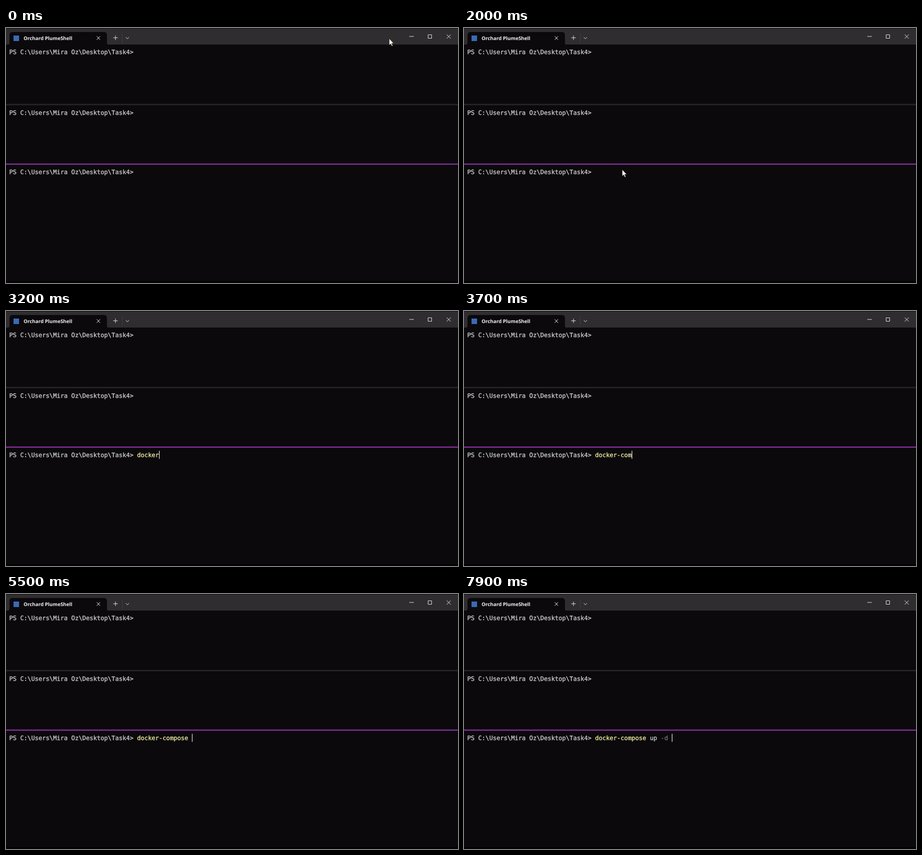
An HTML page with a canvas that plays this animation: 900x508 px, repeating every 8000 ms.

```html
<!DOCTYPE html>
<html lang="en">
<head>
<meta charset="utf-8">
<title>Terminal</title>
<style>
  html, body { margin: 0; width: 100%; height: 100%; overflow: hidden; background: #0b090c; }
  canvas { display: block; }
</style>
</head>
<body>
<canvas id="stage" width="900" height="508"></canvas>
<script>
const ctx = document.getElementById('stage').getContext('2d');
const LOOP = 8000, TICK = 100, BLINK = 530;
const LEFT = 6.5, CELL = 7.27;
const PROMPT = 'PS C:\\Users\\Mira Oz\\Desktop\\Task4>';
const COLORS = { back: '#0b090c', bar: '#2f2d30', text: '#cccacc', command: '#eeeaa2', option: '#767376' };

// One character per tick: "." is a pause, "<" a backspace.
const TYPING_START = 2400;
const TYPING = 'd.oc.ke.r.-compo...use..<<<se.. ...u.p... .........-.d. ';

const POINTER_HOME = { x: 763, y: 21 };
const POINTER_MOVES = [
  { from: 200, to: 500, x: 793, y: 77 },
  { from: 800, to: 1200, x: 201, y: 344 },
  { from: 1300, to: 1400, x: 166, y: 358 },
  { from: 1400, to: 1500, x: 315, y: 282 }
];
const ARROW = new Path2D('M0 0V13.2L3 10.4L5.2 15.2L7.2 14.3L5 9.7H9Z');

function rect(x, y, w, h, color) {
  ctx.fillStyle = color;
  ctx.fillRect(x, y, w, h);
}

function stroke(path, color = '#e4e2e4') {
  ctx.strokeStyle = color;
  ctx.lineWidth = 1;
  ctx.stroke(new Path2D(path));
}

// A hairline outline gives the terminal face its semi-bold weight.
function write(text, column, baseline, color) {
  const x = LEFT + column * CELL;
  ctx.font = '12.08px "DejaVu Sans Mono", monospace';
  ctx.fillStyle = ctx.strokeStyle = color;
  ctx.lineWidth = 0.35;
  ctx.fillText(text, x, baseline);
  ctx.strokeText(text, x, baseline);
}

function drawTitleBar() {
  rect(0, 0, 900, 33, COLORS.bar);
  rect(0, 0, 900, 1, '#0d0b0e');
  ctx.fillStyle = COLORS.back;
  ctx.fill(new Path2D('M4 33Q7 33 7 30V14Q7 8 13 8H195Q201 8 201 14V30Q201 33 204 33Z'));
  rect(15, 15, 11, 11, '#3b69b5');

  ctx.font = '700 9.8px "Open Sans", sans-serif';
  ctx.fillStyle = '#f4f2f4';
  ctx.fillText('Orchard PlumeShell', 35, 24);

  stroke('M180.5 16.5l7 7m0 -7l-7 7');
  stroke('M213.5 19.5h9m-4.5 -4.5v9');
  stroke('M231.5 11v18', '#403e41');
  stroke('M238.5 18.5l3.2 3l3.2 -3');
  stroke('M803 16.8h9');
  stroke('M840.5 13.5h7v7h-7z');
  stroke('M877.5 13l8 8m0 -8l-8 8');
}

function drawPanes() {
  rect(0, 151, 900, 3, '#232124');
  rect(0, 270, 900, 3, '#2c1232');
  rect(0, 270.2, 900, 1.8, '#9a31ae');
  rect(0, 504, 900, 4, '#040305');
  for (const baseline of [52, 173, 291]) write(PROMPT, 0, baseline, COLORS.text);
}

function typedAt(time) {
  let text = '', lastKey = -680;
  [...TYPING].forEach((key, i) => {
    const at = TYPING_START + i * TICK;
    if (at > time || key === '.') return;
    text = key === '<' ? text.slice(0, -1) : text + key;
    lastKey = at;
  });
  return { text, lastKey };
}

function drawCommand(time) {
  const { text, lastKey } = typedAt(time);
  let column = PROMPT.length + 1;
  const caretX = LEFT + (column + text.length) * CELL + 0.2;
  text.split(' ').forEach((word, i) => {
    const color = i === 0 ? COLORS.command : /^-./.test(word) ? COLORS.option : COLORS.text;
    write(word, column, 291, color);
    column += word.length + 1;
  });
  if ((time - lastKey) % (2 * BLINK) < BLINK) rect(caretX, 278.5, 1.2, 16, '#e8e6e8');
}

function pointerAt(time) {
  let { x, y } = POINTER_HOME;
  for (const move of POINTER_MOVES) {
    const p = Math.min(1, Math.max(0, (time - move.from) / (move.to - move.from)));
    const eased = p * p * (3 - 2 * p);
    x += (move.x - x) * eased;
    y += (move.y - y) * eased;
  }
  return { x, y };
}

function drawPointer(time) {
  if (time >= TYPING_START) return;
  const { x, y } = pointerAt(time);
  ctx.save();
  ctx.translate(x, y);
  ctx.fillStyle = '#f8f6e6';
  ctx.fill(ARROW);
  ctx.strokeStyle = COLORS.back;
  ctx.lineWidth = 0.6;
  ctx.stroke(ARROW);
  ctx.restore();
}

function draw(now) {
  const time = Math.floor((now % LOOP) / TICK) * TICK;
  ctx.textRendering = 'geometricPrecision';
  rect(0, 0, 900, 508, COLORS.back);
  drawTitleBar();
  drawPanes();
  drawCommand(time);
  drawPointer(time);
  requestAnimationFrame(draw);
}
requestAnimationFrame(draw);
</script>
</body>
</html>
```
